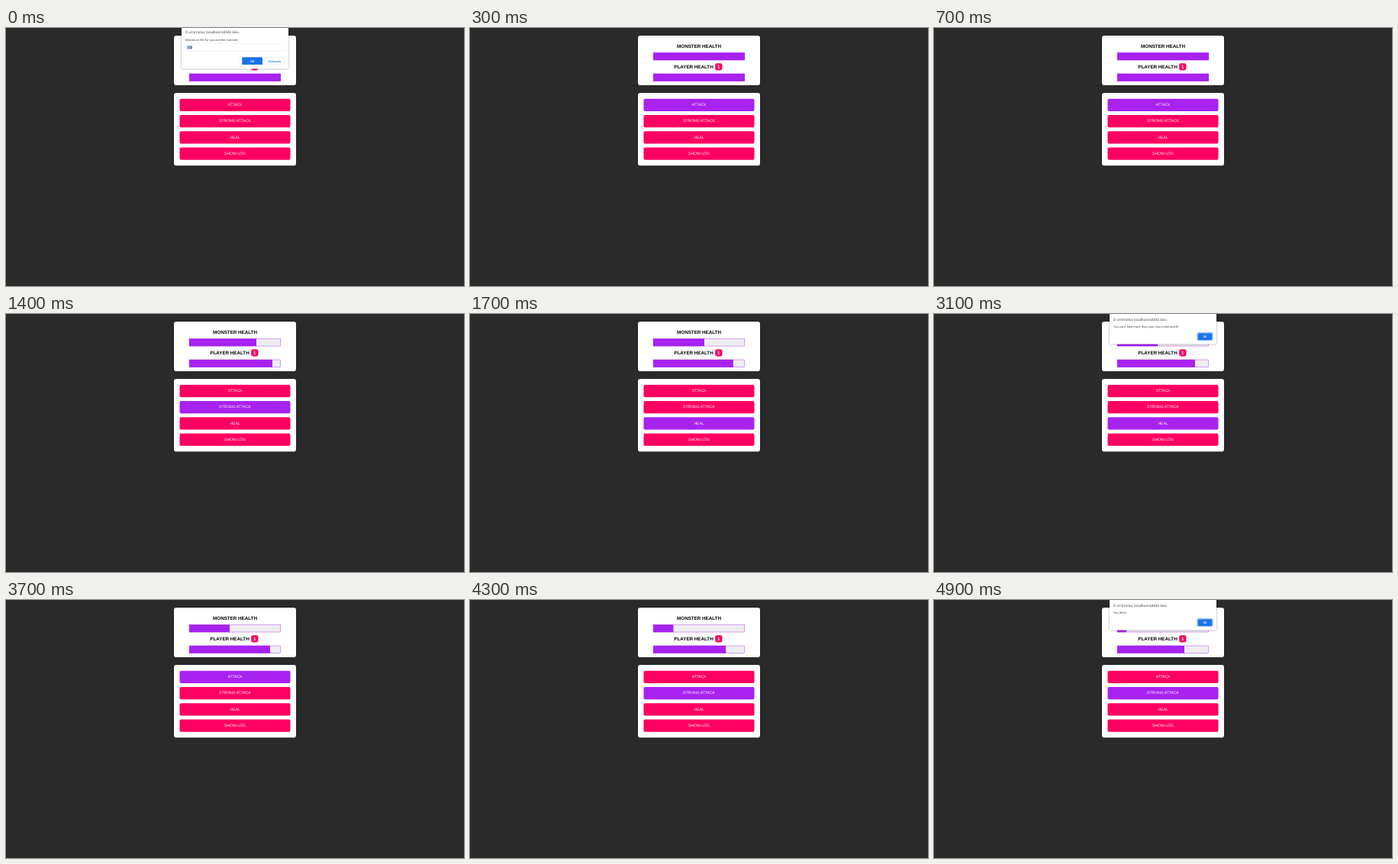
These frames come from a looping animation (600x338 px, 5 s). An HTML page:

```html
<!DOCTYPE html>
<html lang="en">
<head>
<meta charset="utf-8">
<title>Monster health game</title>
<style>
  html, body { margin: 0; width: 100%; height: 100%; overflow: hidden; background: #2b2a2b; }
  svg { display: block; width: 100%; height: 100%; }
  text { font-family: "Liberation Sans", Arial, sans-serif; text-rendering: geometricPrecision; }
  .card { fill: #fff; filter: drop-shadow(0 .6px 1.2px rgba(0, 0, 0, .3)); }
  .heading { font-size: 6.25px; font-weight: bold; fill: #000; }
  .label { font-size: 5.05px; fill: #fff; text-anchor: middle; }
  .dialog text { font-family: Roboto, sans-serif; font-size: 4.06px; fill: #4a4d51; white-space: pre; }
  .dialog .title { font-size: 4.6px; fill: #404347; }
  .dialog .caption { font-size: 3.75px; font-weight: 500; text-anchor: middle; }
  .sheet { fill: #fff; filter: drop-shadow(0 .6px .8px rgba(0, 0, 0, .45)); }
</style>
</head>
<body>
<svg viewBox="0 0 600 338" preserveAspectRatio="none"></svg>
<script>
const LOOP = 5000, STEP = 100, BAR_TIME = 500, FADE_TIME = 300, BAR_WIDTH = 120;
const PINK = '#ff0062', PURPLE = '#a822f0', BLUE = '#1a73e8';
const stage = document.querySelector('svg');

function add(parent, tag, attrs, content = '') {
  const node = document.createElementNS('http://www.w3.org/2000/svg', tag);
  for (const name in attrs) node.setAttribute(name, attrs[name]);
  node.textContent = content;
  return parent.appendChild(node);
}
const rect = (parent, x, y, width, height, attrs) =>
  add(parent, 'rect', { x, y, width, height, ...attrs });
const text = (parent, x, y, content, attrs) =>
  add(parent, 'text', { x, y, ...attrs }, content);

// 0 before start, 1 after start + duration
const progress = (t, start, duration) => Math.min(1, Math.max(0, (t - start) / duration));
const easeOut = p => 1 - (1 - p) ** 2.7;

function healthBar(y) {
  rect(stage, 240, y, BAR_WIDTH, 10, { fill: '#eee' });
  const fill = rect(stage, 240, y, BAR_WIDTH, 10, { fill: PURPLE });
  rect(stage, 240.2, y + .2, BAR_WIDTH - .4, 9.6, { fill: 'none', stroke: PURPLE, 'stroke-width': .4 });
  return fill;
}

function dialogButton(parent, x, y, width, height, label, primary, focused) {
  if (focused) {
    rect(parent, x - .8, y - .8, width + 1.6, height + 1.6,
      { rx: 1.7, fill: '#fff', stroke: '#5a9af0', 'stroke-width': .7 });
  }
  rect(parent, x, y, width, height, primary
    ? { rx: 1.2, fill: BLUE }
    : { rx: 1.2, fill: '#fff', stroke: '#dadce0', 'stroke-width': .4 });
  text(parent, x + width / 2, y + height / 2 + 1.4, label,
    { class: 'caption', style: `fill:${primary ? '#fff' : BLUE}` });
}

function dialog(bottom, titleY, message) {
  const group = add(stage, 'g', { class: 'dialog' });
  rect(group, 230, -20, 140, bottom + 20, { rx: 1.2, class: 'sheet' });
  text(group, 235, titleY, 'Ο ιστότοπος localhost:63342 λέει', { class: 'title' });
  text(group, 235, titleY + 9.1, message);
  return group;
}

function alertDialog(message) {
  const group = dialog(39.6, 9.1, message);
  dialogButton(group, 345.6, 25.3, 18.8, 8.6, 'OK', true, true);
  return group;
}

function promptDialog() {
  const group = dialog(53.4, 7.4, 'Maximum life for you and the monster.');
  rect(group, 235, 20.7, 130, 9.6, { rx: 1, fill: '#fff', stroke: '#dde0e6', 'stroke-width': .5 });
  rect(group, 237.2, 22.8, 6.8, 5, { fill: '#a9bbe2' });
  text(group, 237.3, 26.8, '100');
  dialogButton(group, 309.2, 38.3, 26.8, 9.8, 'OK', true);
  dialogButton(group, 339, 38.3, 26, 9.8, 'Ακύρωση', false);
  return group;
}

rect(stage, 0, 0, 600, 338, { fill: '#2b2a2b' });
rect(stage, 220, 10, 160, 65, { rx: 3.1, class: 'card' });
rect(stage, 220, 85, 160, 95.3, { rx: 3.1, class: 'card' });

text(stage, 300, 25.6, 'MONSTER HEALTH', { class: 'heading', 'text-anchor': 'middle' });
text(stage, 267.3, 53, 'PLAYER HEALTH', { class: 'heading' });
rect(stage, 321.2, 46.2, 9.2, 9.2, { rx: 2.3, fill: PINK });
text(stage, 325.8, 53, '1', { class: 'heading', 'text-anchor': 'middle', style: 'fill:#fff' });

const monsterBar = healthBar(32.2);
const playerBar = healthBar(59.8);

const buttons = ['ATTACK', 'STRONG ATTACK', 'HEAL', 'SHOW LOG'].map((label, i) => {
  const y = 92.8 + i * 21.25;
  const button = rect(stage, 227.5, y, 145, 16.2, { rx: 1.9 });
  text(stage, 300, y + 9.4, label, { class: 'label' });
  return button;
});

const dialogs = [
  { node: promptDialog(), open: -LOOP, close: 0 },
  { node: alertDialog('You cant  heal more than your max initial health.'), open: 1900, close: 3100 },
  { node: alertDialog('You Won!'), open: 4400, close: LOOP }
];

// Each move hovers a button, then changes both bars by the given widths
const moves = [
  { hover: 300, button: 0, time: 700, monster: -32, player: -11 },
  { hover: 1100, button: 1, time: 1400, monster: -35, player: -7 },
  { hover: 1700, button: 2, time: 3100, monster: 0, player: 4 },
  { hover: 3500, button: 0, time: 3700, monster: -23, player: -9 },
  { hover: 4100, button: 1, time: 4200, monster: -18, player: -9 }
];

const barWidth = (who, t) => moves.reduce(
  (width, move) => width + move[who] * progress(t, move.time, BAR_TIME), BAR_WIDTH);

function draw(t) {
  monsterBar.setAttribute('width', barWidth('monster', t));
  playerBar.setAttribute('width', barWidth('player', t));

  const current = moves.filter(move => move.hover <= t).pop();
  buttons.forEach((button, i) =>
    button.setAttribute('fill', i === current?.button ? PURPLE : PINK));

  for (const { node, open, close } of dialogs) {
    const opacity = easeOut(progress(t, open, FADE_TIME + STEP)) * (1 - progress(t, close, FADE_TIME));
    node.setAttribute('opacity', opacity);
    node.setAttribute('transform', `translate(0 ${-16 * (1 - opacity)})`);
  }
}

const begin = performance.now();
function tick() {
  const elapsed = (performance.now() - begin) % LOOP;
  draw(Math.floor(elapsed / STEP) * STEP);
  requestAnimationFrame(tick);
}
tick();
</script>
</body>
</html>
```
